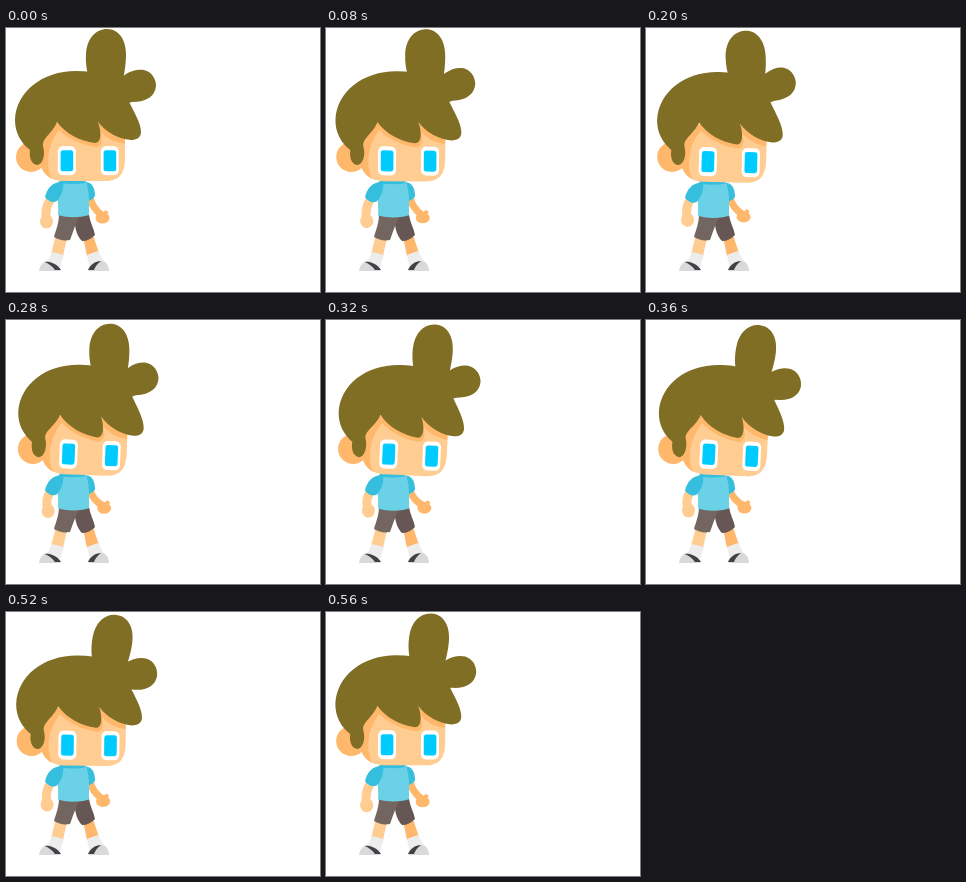
These frames come from a looping animation (314 px wide and 264 px high, 0.6 s). An HTML page:

```html
<!DOCTYPE html>
<html lang="en">
<head>
<meta charset="utf-8">
<title>Idle boy</title>
<style>
  html, body { margin: 0; width: 100%; height: 100%; overflow: hidden; background: #fff; }
  svg { display: block; width: 100vw; height: 100vh; }
  .skin { fill: #ffcc91; }
  .shade { fill: #ffb86b; }
  .hair { fill: #806e25; }
  .limb { fill: none; stroke: #ffcc91; stroke-width: 9; stroke-linecap: round; }
  .far { stroke: #ffb86b; stroke-width: 7; }
  .sock { fill: #ededed; }
  .shoe { fill: #d9d9db; }
  .dark { fill: #424145; }
  .sleeve { fill: #35bedd; }
</style>
</head>
<body>
<svg viewBox="0 0 314 264">
  <defs>
    <clipPath id="faceClip"><path id="face" d="M32 95H119V130C119 147 112 153 99 153H58C44 153 35 146 33 130Z"/></clipPath>
    <g id="eye">
      <rect x="-9" y="-14.5" width="18" height="29" rx="5" fill="#fff"/>
      <rect x="-6.2" y="-10.5" width="12.6" height="21" rx="2.5" fill="#00cbff"/>
    </g>
  </defs>

  <g id="legs">
    <path class="skin" d="M50 207L61 210 57 228 45 226Z"/>
    <path class="shade" d="M77 209L87 207 93 225 81 228Z"/>
    <path class="sock" d="M46 224L58 227 54 239 41 235ZM81 227L92 223 98 234 84 240Z"/>
    <path class="shoe" d="M33 243C34 236 39 232 44 233L55 243ZM82 243L94 233C99 232 103 237 103 243Z"/>
    <path class="dark" d="M39 234C45 233 52 237 55 242H49C46 238 43 236 39 234ZM82 242C84 237 89 233 95 233C91 236 89 239 88 242Z"/>
  </g>

  <path id="leftArm" class="limb"/>
  <path id="rightArm" class="limb far"/>
  <ellipse id="leftHand" class="skin" rx="6.5" ry="7"/>
  <g id="rightHand" class="shade">
    <ellipse rx="7" ry="5.5"/>
    <path d="M-2 -3L3 -8 6 -6 4 -2Z"/>
  </g>
  <path fill="#665654" d="M66 187H83C84 194 88 201 89 207C85 211 81 213 76 213C72 209 70 204 69 197Z"/>
  <path fill="#736560" d="M53 186H75C70 194 67 204 64 212C58 213 53 212 48 209C50 202 53 195 53 186Z"/>
  <g id="torso">
    <path class="sleeve" d="M79 154C86 154 89 160 89 168C87 171 85 172 82 173Z"/>
    <path fill="#6bd1e7" d="M53 153H80C84 165 83 177 83 187C73 190 62 190 52 187C53 176 50 164 53 153Z"/>
    <path class="sleeve" d="M54 152H79V155Q67 157 54 155Z"/>
    <path class="sleeve" d="M57 154C47 153 41 160 39 169C43 174 47 175 51 173C56 167 58 160 57 154Z"/>
  </g>

  <g id="head">
    <circle class="shade" cx="25" cy="129" r="15"/>
    <use href="#face" class="skin"/>
    <g clip-path="url(#faceClip)">
      <path class="shade" d="M30 88H121V116C108 115 99 109 93 102C98 111 96 119 90 119C76 117 62 111 53 102C42 115 38 138 47 153H30Z"/>
    </g>
    <use href="#eye" x="60.8" y="132.7"/>
    <use href="#eye" x="103.8" y="132.7"/>
    <path class="hair" d="M9 92C10 64 36 43 70 43Q78 43 86 44C102 47 114 57 121 70C128 84 135 95 135 104C135 110 130 112 125 112C112 111 100 104 92 94C96 105 95 115 89 115C74 113 60 106 51 94C46 106 36 110 37 118C40 128 36 137 31 137C25 136 23 129 24 122C15 115 9 105 9 92Z"/>
    <path id="tuft" class="hair" d="M88 66C83 52 79 40 80 26C81 10 90 1 101 1C113 1 120 12 120 26C120 38 118 48 114 66Z"/>
    <path id="sideTuft" class="hair" d="M108 58C115 47 127 40 138 42C146 44 150 51 150 58C149 68 141 74 126 74L106 79Z"/>
  </g>
</svg>
<script>
const LOOP = 600, STEP = 40, PEAK = 380;
const $ = id => document.getElementById(id);
const transform = (id, value) => $(id).setAttribute('transform', value);
const smooth = x => x * x * (3 - 2 * x);

// Both tufts trail the head: [ms, tuft degrees, side tuft degrees]
const swayKeys = [
  [0, 0, 0], [120, -3.5, -5.5], [200, -6, -8], [280, -3.5, -5.5],
  [360, 4.5, 2.5], [440, 12, 8], [560, 3.5, 3], [600, 0, 0]
];

function sway(t, column) {
  const i = swayKeys.findIndex(key => key[0] > t);
  const from = swayKeys[i - 1], to = swayKeys[i];
  return from[column] + (to[column] - from[column]) * (t - from[0]) / (to[0] - from[0]);
}

function poseArm(side, shoulderX, elbowX, handX, handY) {
  $(side + 'Arm').setAttribute('d', `M${shoulderX} 169Q${elbowX} 180 ${handX} ${handY - 2}`);
  transform(side + 'Hand', `translate(${handX} ${handY})`);
}

function draw(t) {
  const lean = smooth(t < PEAK ? t / PEAK : (LOOP - t) / (LOOP - PEAK));
  const sideAngle = sway(t, 2);
  const squash = 1 - 0.004 * Math.abs(sideAngle);
  transform('head', `translate(${lean} ${2 * lean}) rotate(${2.7 * lean} 70 153)`);
  transform('tuft', `rotate(${sway(t, 1)} 98 66)`);
  transform('sideTuft', `translate(98 66) rotate(${sideAngle}) scale(${squash} 1) translate(-98 -66)`);
  transform('torso', `translate(0 ${1.5 * lean})`);
  poseArm('left', 46, 38, 40.5 + 2 * lean, 193.5 - 3 * lean);
  poseArm('right', 84, 86, 96.5 + 2 * lean, 190 - 2 * lean);
}

function tick() {
  draw(Math.floor(performance.now() % LOOP / STEP) * STEP);
  requestAnimationFrame(tick);
}
tick();
</script>
</body>
</html>
```
